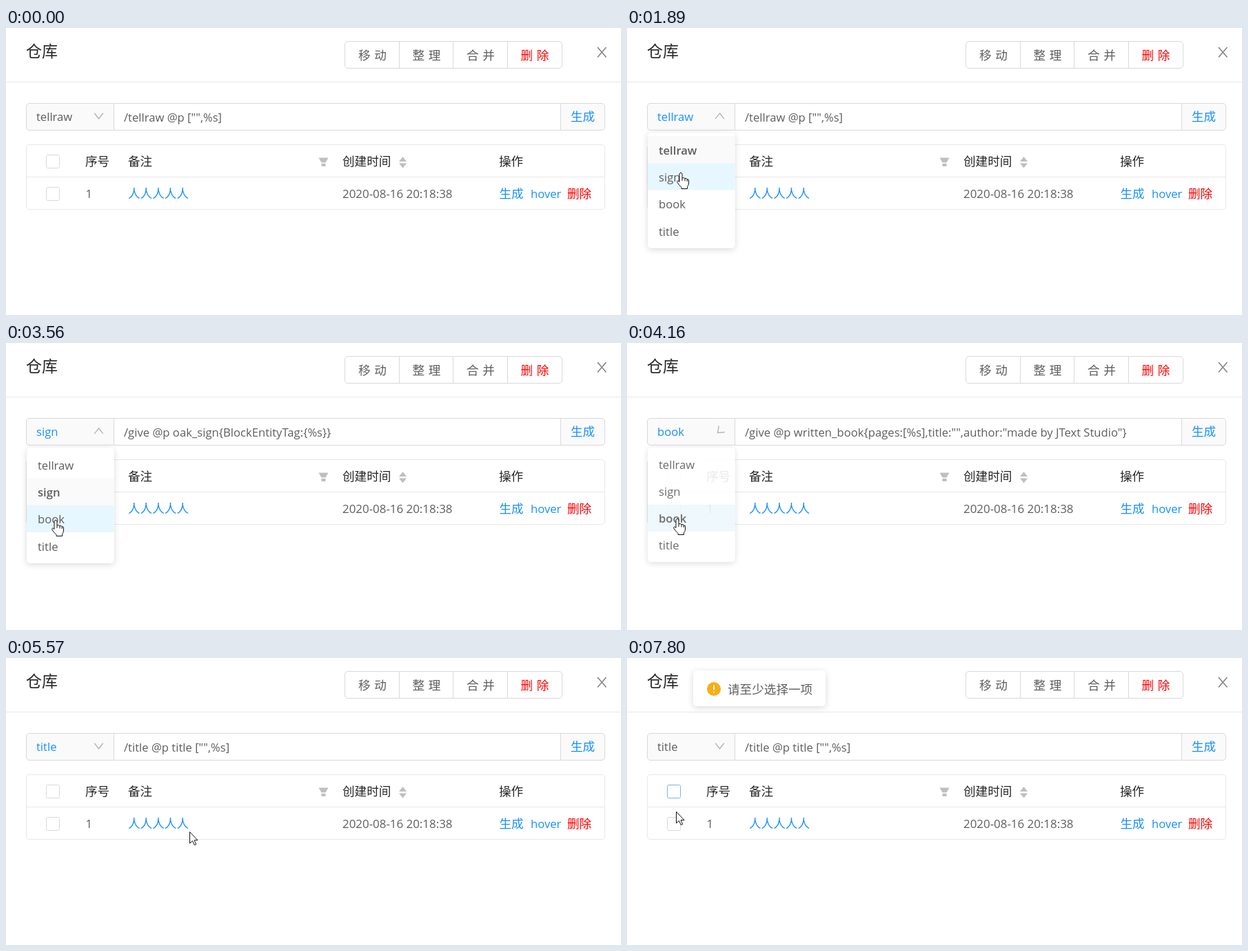
Write an HTML page that moves like this. It is 892 px wide and 417 px high and loops after 8 s.

```html
<!DOCTYPE html>
<html lang="zh">
<head>
<meta charset="utf-8">
<title>仓库</title>
<style>
  html, body { margin: 0; width: 100%; height: 100%; overflow: hidden; background: #fff; }
  svg { display: block; width: 892px; height: 417px; }
  text { font: 16.64px "Open Sans", "Noto Sans", sans-serif; fill: #5e5e5e; white-space: pre; }
  .zh { font: 17.6px "Noto Sans CJK SC", "Noto Sans CJK", sans-serif; }
  .dark { fill: #262626; }
  .title { font-size: 23px; }
  .spaced { letter-spacing: .32em; }
  .link { fill: #1890ff; }
  .danger { fill: #f00; }
  .date { font-size: 16.9px; }
  .box { fill: #fff; stroke: #d9d9d9; }
  .line { fill: none; stroke: #d9d9d9; }
  .pale { stroke: #e8e8e8; }
  .icon { fill: #bfbfbf; }
  .stroke { fill: none; stroke: #b5b5b5; stroke-width: 1.4; }
  .panel { fill: #fff; filter: drop-shadow(0 2.5px 5px rgba(0, 0, 0, .15)); }
  .pointer { fill: #fff; stroke: #111; stroke-linejoin: round; }
</style>
</head>
<body>
<svg viewBox="0 0 892 417">
  <text class="zh dark title" x="29" y="42">仓库</text>
  <path class="line pale" d="M0 78.5H892"/>
  <rect class="box" x="491.5" y="19.5" width="315" height="39" rx="4.5"/>
  <path class="line" d="M570.5 20V58M648.5 20V58M727.5 20V58"/>
  <g id="actions"></g>
  <path class="stroke" style="stroke:#858585;stroke-width:1.6" d="M858 28L870.5 42.5M870.5 28L858 42.5"/>

  <rect class="box" x="29.5" y="109.5" width="839" height="39" rx="4.5" style="fill:#fafafa"/>
  <path class="box" d="M156.5 109.5H804.5V148.5H156.5Z"/>
  <text id="value" x="44" y="135"></text>
  <path id="chevron" class="stroke" d="M128.2 123.7L134.5 131.8L140.8 123.7"/>
  <text id="command" x="171" y="136"></text>
  <text class="zh link" x="819" y="135">生成</text>

  <rect class="box pale" x="29.5" y="169.5" width="839" height="94" rx="4.5"/>
  <path class="line pale" d="M30 216.5H868"/>
  <rect id="checkAll" class="box" x="58.5" y="184.5" width="19" height="19" rx="2"/>
  <rect class="box" x="58.5" y="231.5" width="19" height="19" rx="2"/>
  <text class="zh dark" x="115" y="200">序号</text>
  <text class="zh dark" x="177" y="200">备注</text>
  <path class="icon" d="M453.5 188.5H467.5L463.5 195.5H457.5ZM457.5 197H463.5V201H457.5Z"/>
  <text class="zh dark" x="488" y="200">创建时间</text>
  <path class="icon" d="M570 194L575.5 187L581 194ZM570 196.5H581L575.5 203.5Z"/>
  <text class="zh dark" x="715" y="200">操作</text>
  <text x="115.5" y="247">1</text>
  <text class="zh link" x="177" y="247">人人人人人</text>
  <text class="date" x="488" y="247">2020-08-16 20:18:38</text>
  <text class="zh link" x="715.5" y="247">生成</text>
  <text class="link" x="761" y="247">hover</text>
  <text class="zh danger" x="814" y="247">删除</text>

  <g id="menu">
    <rect class="panel" x="30" y="152" width="126.5" height="168" rx="5"/>
  </g>

  <g id="toast">
    <rect class="panel" x="96" y="18" width="192" height="52" rx="5"/>
    <circle cx="126" cy="45" r="10" fill="#faad14"/>
    <path d="M126 39.3V46.5M126 48.8V50.8" stroke="#fff" stroke-width="1.8"/>
    <text class="zh" x="146" y="51.5">请至少选择一项</text>
  </g>

  <g id="cursor">
    <path id="arrow" class="pointer" d="M0 0V16.5L4 13L6.8 19L9.2 18L6.6 12H11.5Z"/>
    <path id="hand" class="pointer" d="M-2 2Q0-1.5 2 2V8Q4.5 6.5 6 8.8Q8.5 7.5 9.2 10Q11.5 9 11.5 12V16Q11 19 9.5 20.5V23.5H1V21.5Q-3 18-5.3 13.8Q-5 10.5-2 13.5ZM2 8V12M6 9V12.5M9.2 10V13"/>
    <path id="beam" class="line" style="stroke:#222" d="M-3-8.5H3M0-8.5V8.5M-3 8.5H3"/>
  </g>
</svg>
<script>
const LOOP = 8000;
const ROW = 39.37;
const MENU_TOP = 152;
const FIRST_ROW = MENU_TOP + 5;
const BLUE = '#1890ff';
const BLUR_AT = 6200;
const TOAST_AT = 6304;
const CHECK_HOVER_AT = 7600;

const options = [
  ['tellraw', '/tellraw @p ["",%s]'],
  ['sign', '/give @p oak_sign{BlockEntityTag:{%s}}'],
  ['book', '/give @p written_book{pages:[%s],title:"",author:"made by JText Studio"}'],
  ['title', '/title @p title ["",%s]']
];

// Pointer movements, each shown in a few even steps and held until the next one.
const gestures = [
  { from: 200, to: 1240, steps: 6, via: [[150, 90], [105, 130], [80, 206]] },
  { from: 1890, to: 2700, steps: 5, via: [[78, 210], [82, 215], [178.5, 179], [148, 107]] },
  { from: 2950, to: 3560, steps: 4, via: [[112, 125], [72, 257]] },
  { from: 3960, to: 4770, steps: 5, via: [[73, 255], [84, 121], [66, 298]] },
  { from: 5170, to: 6170, steps: 6, via: [[72, 296], [832, 127]] },
  { from: 6380, to: 7400, steps: 6, via: [[819.5, 160.5], [86, 138.5]] },
  { from: 7600, to: 7800, steps: 2, via: [[75, 190], [71.5, 223.5]] }
];

// Each opening of the menu ends with the choice of the next option.
const openings = [
  { open: 748, close: 2387 },
  { open: 3077, close: 3850 },
  { open: 4370, close: 5060 }
];

const $ = id => document.getElementById(id);
const set = (node, attrs) => {
  for (const key in attrs) node.setAttribute(key, attrs[key]);
  return node;
};
const add = (parent, tag, attrs, content = '') => {
  const node = set(document.createElementNS('http://www.w3.org/2000/svg', tag), attrs);
  node.textContent = content;
  return parent.appendChild(node);
};
const inside = (x, y, left, top, right, bottom) => x >= left && x < right && y >= top && y < bottom;
const clamp = p => Math.min(1, Math.max(0, p));
const progress = (t, start, duration) => clamp((t - start) / duration);
const quintOut = p => 1 - (1 - p) ** 5;
const cubicInOut = p => p < .5 ? 4 * p ** 3 : 1 - 4 * (1 - p) ** 3;
const smooth = p => p * p * (3 - 2 * p);
const mix = (a, b, p) => `color-mix(in srgb, ${b} ${100 * p}%, ${a})`;

['移动', '整理', '合并', '删除'].forEach((label, i) =>
  add($('actions'), 'text', { class: 'zh spaced' + (i === 3 ? ' danger' : ''), x: 511 + 78.5 * i, y: 46 }, label));

const rows = options.map(([name], i) => {
  const top = FIRST_ROW + ROW * i;
  return {
    back: add($('menu'), 'rect', { x: 30, y: top, width: 126.5, height: ROW }),
    label: add($('menu'), 'text', { x: 46, y: top + 26.5 }, name)
  };
});

// Returns the pointer's place and the time of the step now on show.
function pointerAt(t) {
  const gesture = gestures.findLast(g => g.from <= t);
  if (!gesture) return { time: 0, x: -50, y: -50 };
  const { from, to, steps, via } = gesture;
  const u = Math.floor(progress(t, from, to - from) * (steps - 1)) / (steps - 1);
  const leg = Math.min(via.length - 2, Math.floor(u * (via.length - 1)));
  const p = cubicInOut(u * (via.length - 1) - leg);
  const [x, y] = via[leg].map((v, axis) => v + (via[leg + 1][axis] - v) * p);
  return { time: from + u * (to - from), x, y };
}

function menuAt(time) {
  const { open, close } = openings.findLast(o => o.open <= time) || { open: LOOP, close: LOOP };
  return {
    shown: quintOut(progress(time, open, 200)) * (1 - progress(time, close, 200) ** 5),
    turn: smooth(progress(time, open, 165)) - smooth(progress(time, close, 165)),
    closing: time >= close
  };
}

function pointerKind(x, y, open) {
  const onSelect = inside(x, y, 29, 109, 157, 149);
  const onButton = inside(x, y, 805, 109, 869, 149);
  const onOption = open && inside(x, y, 30, FIRST_ROW, 157, 315);
  const onCheck = inside(x, y, 58, 184, 78, 204);
  if (onSelect || onButton || onOption || onCheck) return 'hand';
  return inside(x, y, 157, 109, 805, 149) ? 'beam' : 'arrow';
}

function drawMenu({ shown, closing }, chosen, x, y) {
  const hovered = inside(x, y, 30, FIRST_ROW, 157, 314) ? Math.floor((y - FIRST_ROW) / ROW) : chosen;
  const highlight = closing ? '#eef8fc' : '#e6f7ff';
  rows.forEach(({ back, label }, i) => {
    set(back, { fill: i === hovered ? highlight : i === chosen ? '#fafafa' : '#fff' });
    label.style.fontWeight = i === chosen ? 600 : 400;
  });
  const scale = .8 + .2 * shown;
  set($('menu'), {
    opacity: shown ** 2,
    transform: `translate(0 ${MENU_TOP * (1 - scale)}) scale(1 ${scale})`
  });
}

function draw(t) {
  const { time, x, y } = pointerAt(t);
  const menu = menuAt(time);
  const chosen = openings.filter(o => o.close <= time).length;
  const focus = time < BLUR_AT ? progress(time, openings[0].open, 150) : 0;

  $('value').textContent = options[chosen][0];
  $('value').style.fill = mix('#5e5e5e', BLUE, focus);
  $('command').textContent = options[chosen][1];
  set($('chevron'), { transform: `rotate(${180 * menu.turn} 134.5 127.8)` });
  drawMenu(menu, chosen, x, y);

  const glow = time < CHECK_HOVER_AT ? 0 : 1 - progress(time, CHECK_HOVER_AT, 400);
  $('checkAll').style.stroke = mix('#d9d9d9', BLUE, glow);

  const toast = quintOut(progress(time, TOAST_AT, 200));
  set($('toast'), { opacity: toast ** 2, transform: `translate(0 ${-16 * (1 - toast)})` });

  const kind = pointerKind(x, y, menu.shown > 0);
  for (const id of ['arrow', 'hand', 'beam']) $(id).style.display = id === kind ? '' : 'none';
  set($('cursor'), { transform: `translate(${x} ${y})` });
}

const start = performance.now();
function tick() {
  draw((performance.now() - start) % LOOP);
  requestAnimationFrame(tick);
}
tick();
</script>
</body>
</html>
```
